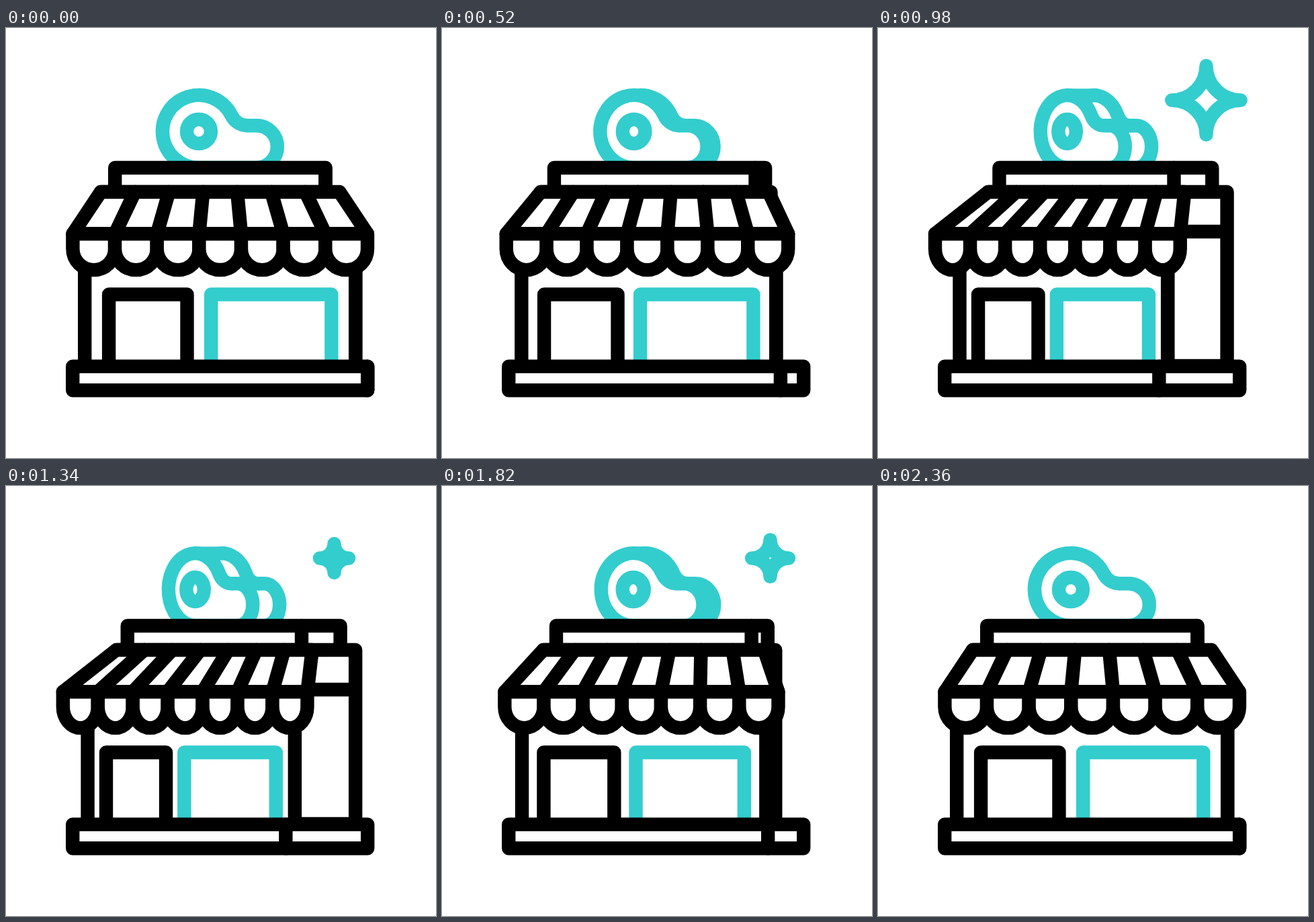
An HTML page with a canvas for the animation above (2400 ms loop, 640 px wide and 640 px high).

```html
<!DOCTYPE html>
<html lang="en">
<head>
<meta charset="utf-8">
<title>Butcher shop</title>
<style>
html, body { margin: 0; height: 100%; overflow: hidden; background: #fff; }
canvas { display: block; }
</style>
</head>
<body>
<canvas id="stage" width="640" height="640"></canvas>
<script>
const ctx = document.getElementById('stage').getContext('2d');
const TEAL = '#33cdcd', BLACK = '#000', LOOP = 2400;

const mix = (a, b, k) => a + (b - a) * k;
const smooth = s => s * s * (3 - 2 * s);

// Symmetric cubic bezier (a, 0, 1 - a, 1)
function ease(u, a) {
  let lo = 0, hi = 1;
  for (let i = 0; i < 24; i++) {
    const s = (lo + hi) / 2, r = 1 - s;
    const x = 3 * a * s * r * r + 3 * (1 - a) * s * s * r + s * s * s;
    if (x < u) lo = s; else hi = s;
  }
  return smooth(lo);
}

function draw(d, color, filled) {
  const path = new Path2D(d);
  if (filled) {
    ctx.fillStyle = '#fff';
    ctx.fill(path);
  }
  ctx.strokeStyle = color;
  ctx.stroke(path);
}

const frame = (left, right, top, bottom) => `M${left},${bottom}V${top}H${right}V${bottom}`;

function drawMeat(turn) {
  const left = 233.2 + 8.9 * turn;
  const k = (403.8 - 36.8 * turn - left) / 170.6;
  const depth = 40.2 * turn;
  const x = (v, shift = 0) => left + (v - 233.2) * k + shift;
  const cut = shift => `M${x(287, shift)},208
    A${54 * k},54 0 1 1 ${x(335.4, shift)},130
    A${27 * k},27 0 0 0 ${x(359.6, shift)},145.2H${x(372.5, shift)}
    A${31.3 * k},31.4 0 0 1 ${x(372.5, shift)},208Z`;
  draw(cut(depth), TEAL, true);
  draw(`M${x(287)},100.4h${depth}M${x(365)},145.2h${depth}`, TEAL);
  draw(cut(0), TEAL, true);
  const rx = 18 * k;
  draw(`M${x(287) - rx},154a${rx},18 0 1 1 ${2 * rx},0a${rx},18 0 1 1 ${-2 * rx},0Z`, TEAL);
}

function drawShop(turn, baseTurn) {
  const signLeft = 162.2 + 18.7 * turn, signEdge = 475.5 - 35.8 * turn;
  draw(frame(signLeft, 475.5 + 22.3 * turn, 208, 244), BLACK, true);
  draw(`M${signEdge},208V244`, BLACK);

  const topLeft = 141 + 23.5 * turn, topRight = 496.4 - 41 * turn;
  const lowLeft = 99.4 - 14.7 * turn, lowRight = 538 - 90.3 * turn;
  const postLeft = 117.2 + 4.4 * turn, postRight = 520.2 - 91.1 * turn;
  const side = 479 + 41.5 * turn;
  draw(`M${topLeft},244H${side}V503H${postRight}V303H${side}`, BLACK, true);

  draw(frame(postLeft, postRight, 306, 503), BLACK, true);
  draw(frame(153.1 - 4.1 * turn, 269.5 - 31.7 * turn, 396.5, 503), BLACK);
  draw(frame(305.2 - 40.2 * turn, 484.4 - 83.3 * turn, 396.5, 503), TEAL);

  draw('M99.2,503.6H538.2V539.3H99.2Z', BLACK, true);
  draw(`M${538.2 - 123 * baseTurn},503.6v35.7`, BLACK);

  draw(`M${lowLeft},306.3L${topLeft},244H${topRight}L${lowRight},306.3Z`, BLACK, true);
  const width = (lowRight - lowLeft) / 7;
  for (let i = 0; i < 7; i++) {
    const x = lowLeft + i * width;
    draw(`M${x},306.3V328.8a${width / 2},31.3 0 0 0 ${width},0V306.3Z`, BLACK, true);
    if (i) draw(`M${x},306.3L${mix(topLeft, topRight, i / 7)},244`, BLACK);
  }
}

// Sparkle keys: [time, radius]
const SPARKLE = [[578, 0], [820, 67.3], [1252, 16], [1685, 67.3], [1927, 0]];

function drawSparkle(t) {
  const i = SPARKLE.findIndex(([time]) => time > t);
  if (i < 1) return;
  const [t0, r0] = SPARKLE[i - 1], [t1, r1] = SPARKLE[i];
  const r = mix(r0, r1, smooth((t - t0) / (t1 - t0)));
  const arc = (x, y) => `a${r},${r} 0 0 0 ${x * r},${y * r}`;
  draw(`M488.5,${107.5 - r}${arc(1, 1)}${arc(-1, 1)}${arc(-1, -1)}${arc(1, -1)}Z`, TEAL, true);
}

function render(now) {
  const t = now % LOOP;
  const u = 1 - Math.abs(1 - t / (LOOP / 2));
  const turn = ease(u, 0.8);
  ctx.fillStyle = '#fff';
  ctx.fillRect(0, 0, 640, 640);
  ctx.lineWidth = 20.4;
  ctx.lineJoin = ctx.lineCap = 'round';
  drawMeat(turn);
  drawShop(turn, ease(u, 0.75));
  drawSparkle(t);
}

const start = performance.now();
function tick() {
  render(performance.now() - start);
  requestAnimationFrame(tick);
}
tick();
</script>
</body>
</html>
```
